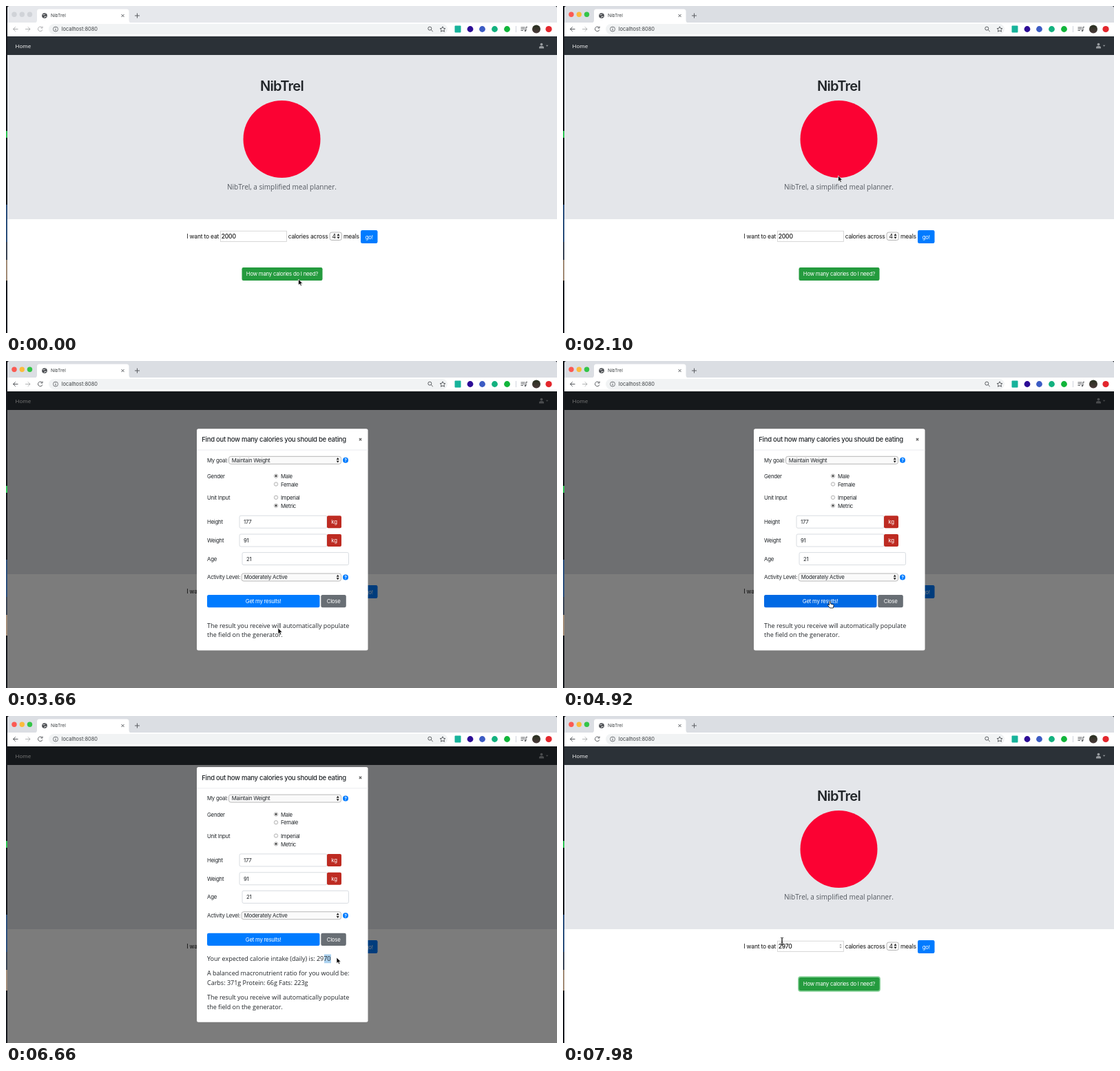
Recreate the animation shown at these times as an HTML page. Size 800 by 474 pixels, loop 8 s.

```html
<!DOCTYPE html>
<html lang="en">
<head>
<meta charset="utf-8">
<title>NibTrel</title>
<style>
html, body { margin: 0; height: 100%; overflow: hidden; background: #15171c; }
svg { display: block; width: 100vw; height: 100vh; }
text { font: 7.8px Inter, "Liberation Sans", sans-serif; letter-spacing: -.24px; fill: #212529; white-space: pre; }
.mid { text-anchor: middle; }
.w { fill: #fff; }
.line { font-size: 8.5px; letter-spacing: -.2px; fill: #111; }
.open { font-family: "Open Sans", "Noto Sans", sans-serif; font-size: 9px; letter-spacing: 0; }
.chrome { letter-spacing: 0; fill: #3c4043; }
.icon { fill: none; stroke: #5a5d61; stroke-width: 1; }
.box { fill: #fff; stroke: #ced4da; stroke-width: .8; }
.pick { fill: #fafafa; stroke: #a6a6a6; stroke-width: .8; }
</style>
</head>
<body>
<svg id="stage" viewBox="0 0 800 474"></svg>
<script>
const text = (x, y, s, cls = '', more = '') => `<text x="${x}" y="${y}" class="${cls}" ${more}>${s}</text>`;
const rect = (x, y, w, h, r, more) => `<rect x="${x}" y="${y}" width="${w}" height="${h}" rx="${r}" ${more}/>`;
const dot = (x, y, r, fill, more = '') => `<circle cx="${x}" cy="${y}" r="${r}" fill="${fill}" ${more}/>`;
const path = (d, more = 'class="icon"') => `<path d="${d}" ${more}/>`;
const arrows = (x, y) => path(`M${x - 2} ${y - .8}l2-2.9 2 2.9zM${x - 2} ${y + .8}l2 2.9 2-2.9z`, 'fill="#222"');
const help = y => dot(493, y, 4, '#007bff') + text(493, y + 2.4, '?', 'mid w', 'style="font-size:6.6px;font-weight:700;letter-spacing:0"');
const radio = (y, label, on) => dot(392, y, 2.7, '#f6f6f6', 'stroke="#999" stroke-width=".7"') +
  (on ? dot(392, y, 1.4, '#333') : '') + text(399, y + 3.1, label);
const field = (x, y, w, value) => rect(x, y, w, 18, 2, 'class="box"') + text(x + 6, y + 12, value);
const unit = y => rect(466, y, 21, 18, 2, 'fill="#be2b22"') + text(476.5, y + 11.8, 'kg', 'mid w');

const browser = `
  ${rect(0, 181, 2, 10, 0, 'fill="#2fc255"')}
  ${rect(0, 288, 2, 54, 0, 'fill="#2c4f7c"')}${rect(0, 342, 2, 26, 0, 'fill="#3c4656"')}${rect(0, 368, 2, 30, 0, 'fill="#a38d78"')}
  ${rect(2, 0, 798, 41, 3, 'id="strip"')}
  ${path('M41 24.5q4 0 4-4V8q0-3.5 3.5-3.5H175q3.5 0 3.5 3.5v12.5q0 4 4 4z', 'fill="#fff"')}
  ${[12, 23.3, 34.5].map(x => dot(x, 12.3, 3.7, '', 'class="lamp"')).join('')}
  ${dot(56, 14, 3.8, '#46494d')}${path('M53.5 12.5l2 .5 1.5-1.5M55 16.5l2-1.5 1.5.5', 'fill="none" stroke="#fff" stroke-width="1"')}
  ${text(65, 16.4, 'NibTrel', 'chrome', 'style="font-size:6.6px"')}
  ${path('M167.5 12l4 4m0-4l-4 4')}${path('M187 14h7m-3.5-3.5v7')}
  ${rect(2, 24, 798, 20, 0, 'fill="#fff"')}
  ${rect(62, 26, 579, 15, 7.5, 'fill="#f1f3f4"')}
  <g id="nav">${path('M17.5 33.5h-7m3.3-3.3l-3.3 3.3 3.3 3.3')}${path('M52.3 31.2a3.3 3.3 0 1 0 .6 3.2M53 29.5v2.5h-2.5')}</g>
  ${path('M28 33.5h7m-3.3-3.3l3.3 3.3-3.3 3.3', 'class="icon" opacity=".45"')}
  ${path('M72 33v2.5m0-4.2v.9')}${dot(72, 33.5, 3.5, 'none', 'class="icon" style="stroke-width:.8"')}
  ${text(80.8, 36.3, 'localhost:8080', 'chrome', 'style="font-size:7.4px"')}
  ${dot(615.3, 32.6, 2.5, 'none', 'class="icon"')}${path('M617.2 34.5l2.6 2.6')}
  ${path('M634 29.8l1.2 2.5 2.7.3-2 1.9.6 2.7-2.5-1.4-2.5 1.4.6-2.7-2-1.9 2.7-.3z')}
  ${rect(651.5, 28.5, 9, 10, 1, 'fill="#17b39b"')}
  ${[[674, '#2c0b96'], [691.5, '#3c5cc4'], [709.5, '#13b17f'], [727.5, '#10b53a']].map(([x, c]) => dot(x, 33.5, 4.4, c)).join('')}
  ${path('M740.5 29v9', 'stroke="#cfd4dd" stroke-width="1"')}
  ${path('M747.5 31h6m-6 2.2h6m-6 2.3h3.5M757 30.5h-2v5')}${dot(754, 35.7, 1.3, '#5a5d61')}
  ${dot(770, 33.5, 6, 'url(#face)')}
  ${dot(788, 33.5, 4.6, '#e3262c')}`;

const page = `
  ${rect(2, 44, 798, 430, 0, 'fill="#fff"')}
  ${rect(2, 44, 798, 27, 0, 'fill="#2b3137"')}
  ${text(13.6, 60.6, 'Home', 'open w', 'style="font-size:8px"')}
  ${dot(777.5, 55.6, 1.9, '#989ca0')}${path('M774 61.5v-1.2q0-2.3 3.5-2.3t3.5 2.3v1.2zM783.8 56.8h3.6l-1.8 2z', 'fill="#989ca0"')}
  ${rect(2, 71, 798, 238, 0, 'fill="#e4e6ea"')}
  ${text(400.5, 123, 'NibTrel', 'mid', 'style="font-size:20px;font-weight:600;letter-spacing:-.7px"')}
  ${dot(400.5, 193, 56, '#fb0233')}
  ${text(400.5, 265.6, 'NibTrel, a simplified meal planner.', 'open mid', 'style="font-size:10px;fill:#545960"')}
  ${text(262.3, 336.6, 'I want to eat', 'line')}
  ${rect(311.5, 326.2, 96, 15.3, 0, 'fill="#fff" stroke="#cfcfcf" stroke-width=".8"')}
  ${text(312.8, 336.7, '2000', 'line', 'id="amount" style="font-weight:500"')}
  <g id="spin">${path('M401.3 332.6l1.7-2.2 1.7 2.2zM401.3 334.6l1.7 2.2 1.7-2.2z', 'fill="#999"')}</g>
  ${text(409.7, 336.6, 'calories across', 'line')}
  ${rect(470, 328, 17.5, 11.5, 3, 'class="pick"')}${text(473.5, 336.8, '4', 'line')}${arrows(482.5, 333.7)}
  ${text(490, 336.6, 'meals', 'line')}
  ${rect(515, 325, 24.5, 19, 2.3, 'fill="#007bff"')}${text(527.2, 337.8, 'go!', 'mid w')}
  ${rect(342, 378.2, 118, 20.6, 3, 'id="ring" fill="none" stroke="#85d096" stroke-width="1.8"')}
  ${rect(342.5, 379, 117, 19, 2.3, 'id="ask"')}${text(400.9, 391.3, 'How many calories do I need?', 'mid w')}
  ${rect(2, 44, 798, 430, 0, 'id="shade"')}`;

const modal = `<g id="modal">
  ${rect(277, 98.3, 248.5, 321.2, 2.5, 'id="card" fill="#fff"')}
  ${path('M277 129h248.5', 'stroke="#e6e8eb" stroke-width=".8"')}
  ${text(284.2, 117.2, 'Find out how many calories you should be eating', '', 'style="font-size:9.5px;font-weight:500;letter-spacing:-.25px"')}
  ${path('M512.8 111.9l3.4 3.4m0-3.4l-3.4 3.4', 'stroke="#555" stroke-width="1.2"')}
  ${text(292, 146.5, 'My goal:')}${rect(323.5, 138.3, 163, 11, 3, 'class="pick"')}
  ${text(327.8, 146.5, 'Maintain Weight')}${arrows(481.7, 143.8)}${help(143.7)}
  ${text(292, 169.8, 'Gender')}${radio(166.7, 'Male', 1)}${radio(178.5, 'Female')}
  ${text(292, 200.9, 'Unit Input')}${radio(197.8, 'Imperial')}${radio(209.7, 'Metric', 1)}
  ${text(292, 236, 'Height')}${field(339, 224.2, 127, 177)}${unit(224.2)}
  ${text(292, 262.8, 'Weight')}${field(339, 251, 127, 91)}${unit(251)}
  ${text(292, 289.5, 'Age')}${field(343, 277.6, 154.5, 21)}
  ${text(292, 316.3, 'Activity Level:')}${rect(342, 308, 144.5, 11, 3, 'class="pick"')}
  ${text(345.8, 316.3, 'Moderately Active')}${arrows(481.7, 313.5)}${help(313.4)}
  ${rect(292, 339, 163.5, 18.3, 2.3, 'id="get"')}${text(373.7, 351.3, 'Get my results!', 'mid w')}
  ${rect(457.3, 339, 36.5, 18.3, 2.3, 'fill="#686e74"')}${text(475.6, 351.3, 'Close', 'mid w')}
  <g id="result">
    ${rect(462, 369.7, 0, 12.8, 0, 'id="mark" fill="#acd2f0"')}
    ${text(292, 379.5, 'Your expected calorie intake (daily) is: 2970', 'open')}
    ${text(292, 400.5, 'A balanced macronutrient ratio for you would be:', 'open')}
    ${text(292, 414, 'Carbs: 371g Protein: 66g Fats: 223g', 'open')}
  </g>
  <g id="note">
    ${text(292, 386.9, 'The result you receive will automatically populate', 'open')}
    ${text(292, 400.4, 'the field on the generator.', 'open')}
  </g></g>`;

const ink = 'fill="#000" stroke="#fff" stroke-width=".7" stroke-linejoin="round"';
const cursor = `<g id="cursor">
  ${path('M0 0v8.6l2-1.8 1.4 3 1.5-.7-1.4-2.9h2.7z', ink)}
  ${path('M-1 .8q1-1.6 2 0v3.2l3.7.9q1.1.4.9 1.7l-.8 3.4H0L-3 6.3q-.5-1.3.7-1.2L-1 6z', 'fill="#fff" stroke="#000" stroke-width=".8" stroke-linejoin="round"')}
  ${path('M-2-5.3q2 0 2 1.3v8q0 1.3-2 1.3M2-5.3q-2 0-2 1.3v8q0 1.3 2 1.3M-1 1.5h2', 'fill="none" stroke="#222" stroke-width=".9"')}</g>`;

const stage = document.getElementById('stage');
stage.innerHTML = `<defs><linearGradient id="face" x2="0" y2="1">
  <stop stop-color="#27301f"/><stop offset="1" stop-color="#4b3a3a"/></linearGradient></defs>` + browser + page + modal + cursor;

const $ = id => document.getElementById(id);
const set = (id, name, value) => $(id).setAttribute(name, value);
const show = (el, on) => el.style.display = on ? '' : 'none';
const ramp = (t, start, length) => Math.min(1, Math.max(0, (t - start) / length));
const easeOut = p => 1 - (1 - p) ** 2.2;

const LOOP = 8000, FOCUS = 1500, CLICK = 2790, RESULT = 5160, CLOSE = 6760;
// time, x, y of the pointer
const route = [
  [0, 424.5, 396], [360, 424.5, 396], [1250, 399.5, 246], [2100, 399.5, 246], [2680, 395.5, 390],
  [3500, 395.5, 390], [4500, 387.5, 348], [5350, 387.5, 348], [5950, 462, 351], [6150, 462, 351],
  [6500, 480, 350], [6660, 480, 350], [6750, 475, 327], [6850, 475, 327], [7120, 450.5, 354.5],
  [7250, 450.5, 354.5], [7870, 332, 333], [7980, 318, 326.5], [8000, 318, 326.5]
];

function pointer(t) {
  const i = route.findIndex(k => k[0] > t);
  const [a, x, y] = route[i - 1], [b, u, v] = route[i];
  const p = (t - a) / (b - a), s = p * p * (3 - 2 * p);
  return [x + (u - x) * s, y + (v - y) * s];
}

function draw(t) {
  const active = t >= FOCUS, done = t >= RESULT;
  set('strip', 'fill', active ? '#dbdee3' : '#e6e8ec');
  set('nav', 'opacity', active ? 1 : .5);
  document.querySelectorAll('.lamp').forEach((el, i) =>
    el.setAttribute('fill', active ? ['#fb5a53', '#fbbb3c', '#33c548'][i] : '#d0d3d8'));

  const [x, y] = pointer(t);
  const inField = t > 7250 && x < 407 && y > 326 && y < 341;
  const onAsk = active && t < 2840 && y > 379;
  const onGet = t > 4000 && !done && y < 357;
  const kind = onAsk || onGet ? 1 : inField || t > 5850 && t < 6380 ? 2 : 0;
  set('cursor', 'transform', `translate(${x} ${y})`);
  [...$('cursor').children].forEach((el, i) => show(el, i === kind));

  $('amount').textContent = done ? '2970' : '2000';
  show($('spin'), inField);
  show($('ring'), t > CLICK && t < 3260 || t > 7215);
  set('ask', 'fill', t > CLICK - 200 && t < 3260 ? '#218838' : '#249b3e');
  set('get', 'fill', onGet ? '#0069e4' : '#007bff');
  set('shade', 'opacity', .515 * (ramp(t, 2820, 115) - ramp(t, CLOSE + 305, 150)));

  const drop = easeOut(ramp(t, 2960, 300)) - easeOut(ramp(t, CLOSE, 300));
  const grow = done ? 48.5 : 0;
  set('modal', 'opacity', ramp(t, 2960, 150) - ramp(t, CLOSE, 150));
  set('modal', 'transform', `translate(0 ${-25 * (1 - drop) - grow / 2})`);
  set('card', 'height', 321.2 + grow);
  set('note', 'transform', `translate(0 ${grow})`);
  show($('result'), done);
  set('mark', 'width', t > 6150 && t < CLOSE ? Math.min(10, Math.max(0, x - 462)) : 0);
}

const start = performance.now();
(function tick() {
  draw((performance.now() - start) % LOOP);
  requestAnimationFrame(tick);
})();
</script>
</body>
</html>
```
